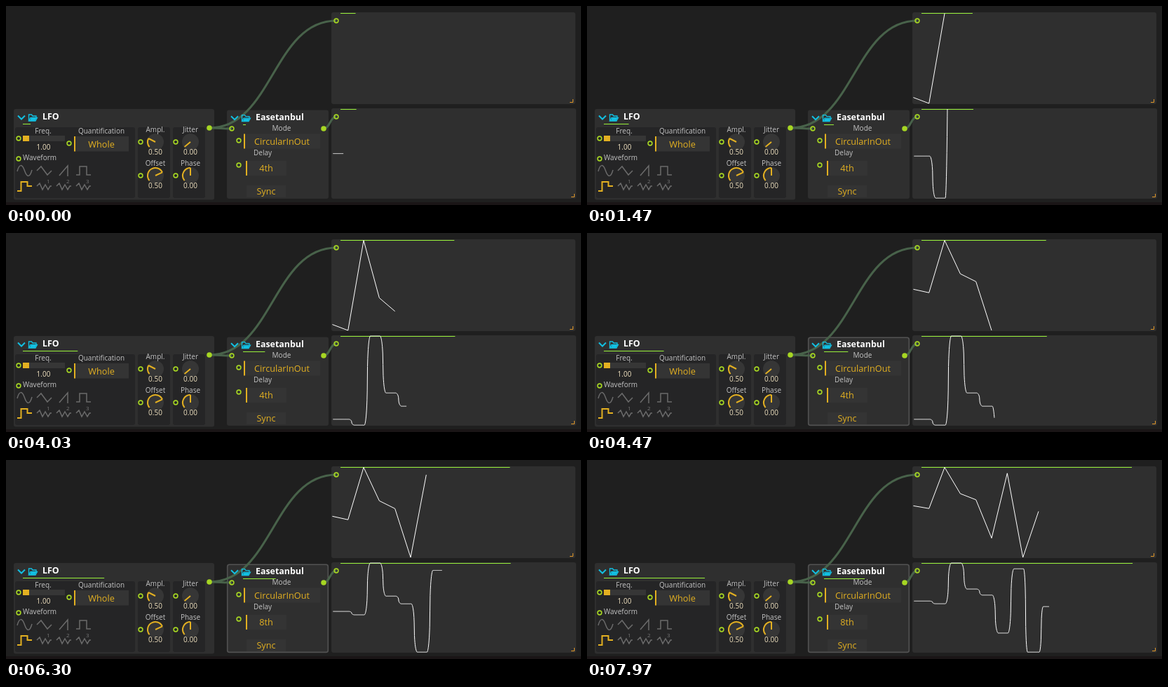
Recreate the animation shown at these times as an HTML page. Size 820 by 284 pixels, loop 8 s.

```html
<!DOCTYPE html>
<html lang="en">
<head>
<meta charset="utf-8">
<title>LFO patch</title>
<style>
html, body { margin: 0; width: 100%; height: 100%; overflow: hidden; background: #1f1f1f; }
svg { display: block; width: 820px; height: 284px; font-family: "Open Sans", "Noto Sans", sans-serif; fill: none; }
.label { font-size: 10px; fill: #c4c4c4; }
.number { font-size: 10px; fill: #f0e2c0; }
.value { font-size: 12.7px; fill: #e3b021; }
.title { font-size: 12.4px; font-weight: 700; fill: #fff; }
.digit { font-size: 8px; fill: #757575; }
.mid { text-anchor: middle; }
.cable { stroke: #48624a; stroke-width: 3; }
.wave { stroke: #6b6b6b; stroke-width: 1.5; }
.gold { stroke: #e3b021; stroke-width: 2; }
.port { stroke: #a6d623; stroke-width: 1.6; }
.plot { stroke: #fff; stroke-width: 1; stroke-linejoin: round; }
</style>
</head>
<body>
<svg id="stage" viewBox="0 0 820 284"></svg>
<script>
const stage = document.getElementById('stage');

const box = (x, y, w, h, fill, r = 0) =>
  `<rect x="${x}" y="${y}" width="${w}" height="${h}" rx="${r}" fill="${fill}"/>`;
const panel = (x, y, w, h) => box(x, y, w, h, '#2f2f2f', 3);
const inset = (x, w) => box(x, 173, w, 101, '#252526', 3);
const line = (d, cls) => `<path d="${d}" class="${cls}"/>`;
const text = (x, y, s, cls, id = '') => `<text x="${x}" y="${y}" class="${cls}" id="${id}">${s}</text>`;
const label = (x, y, s) => text(x, y, s, 'label mid');
const port = (x, y) => `<circle cx="${x}" cy="${y}" r="2.9" class="port"/>`;
const outlet = (x, y) => `<circle cx="${x}" cy="${y}" r="3.8" fill="#a6d623"/>`;
const bar = id => `<rect id="${id}" height="1" fill="#98f03a"/>`;

function choice(x, y, w, h, s, marked, id) {
  return box(x, y, w, h, '#343434') + (marked ? box(x, y, 2, h, '#e3b021') : '') +
    text(x + w / 2, y + h / 2 + 4.8, s, 'value mid', id);
}

// Angles are in degrees clockwise from the top.
function knob(x, y, angle, name, value) {
  const at = (deg, r) => {
    const a = deg * Math.PI / 180;
    return `${(x + r * Math.sin(a)).toFixed(2)} ${(y - r * Math.cos(a)).toFixed(2)}`;
  };
  const start = -130;
  return `<circle cx="${x}" cy="${y}" r="12" fill="#363636"/>` +
    line(`M${at(start, 11)}A11 11 0 ${angle - start > 180 ? 1 : 0} 1 ${at(angle, 11)}`, 'gold') +
    line(`M${x} ${y}L${at(angle, 11)}`, 'gold') +
    label(x, y - 14, name) + text(x, y + 18, value, 'number mid') + port(x - 21, y);
}

function heading(x, y, s) {
  return `<g stroke="#12c0e2" transform="translate(${x} ${y})">
    <path d="M0 0l5 5 5-5" stroke-width="2"/>
    <path d="M15.5 7.5V-1.5h4l1.5 2h5v2.5M15.5 7.5l2.5-4.5h9.5l-2.5 4.5z" stroke-width="1.3"/>
    <path d="M18.5 3.5h8l-2 4h-8z" fill="#12c0e2" stroke="none"/></g>` +
    text(x + 35, y + 5.5, s, 'title');
}

const noise = (x, n) =>
  line(`M${x} 257l4-4 4 9 4-7 4 7 3-5h2`, 'wave') + text(x + 14, 253, n, 'digit');

stage.innerHTML =
  box(0, 0, 820, 284, '#1f1f1f') + box(0, 280, 820, 4, '#1a1516') +
  panel(11, 147, 286, 129.5) + inset(13, 171) + inset(188, 46) + inset(238, 46) +
  panel(315, 148.5, 145, 126.5) + panel(464, 9, 348, 131) + panel(464, 146, 349, 129) +
  '<rect id="outline" x="315.7" y="149.2" width="143.6" height="125.2" rx="3" stroke="#525252" stroke-width="1.6"/>' +
  line('M290 174C380 174 381 21 471 21M290 174C306 174 306 175 322 175', 'cable') +
  line('M453 175C462 175 462 158 471 158', 'cable') +
  heading(17, 156.5, 'LFO') + heading(321, 157.2, 'Easetanbul') +
  // oscillator controls
  label(53, 182, 'Freq.') + box(24, 185, 60, 8, '#363636') + box(24, 185, 9, 8, '#e3b021') +
  text(53.5, 205, '1.00', 'number mid') +
  label(136, 182, 'Quantification') + choice(97, 186, 78, 21.5, 'Whole', true) +
  text(24, 220, 'Waveform', 'label') +
  line('M16 236C19 225 23 225 26.5 235S34 245 37 234', 'wave') +
  line('M44 235l6-6 9 12 6-6', 'wave') + line('M76 242L88 228V243', 'wave') +
  line('M100 241h5v-12h10v12h6', 'wave') +
  line('M16 264h5.5v-13h9v6h6.5', 'gold') +
  noise(44, 1) + noise(72, 2) + noise(100, 3) +
  knob(213, 194, -63, 'Ampl.', '0.50') + knob(263, 194, -130, 'Jitter', '0.00') +
  knob(213, 242, 65, 'Offset', '0.50') + knob(263, 242, 0, 'Phase', '0.00') +
  // easing controls
  label(393, 178.3, 'Mode') + choice(339, 182.5, 109, 21, 'CircularInOut', true) +
  label(366, 213, 'Delay') + choice(342, 221, 58, 21, '4th', true, 'delay') +
  choice(343, 256, 56, 17, 'Sync', false) +
  port(18, 189) + port(90, 196) + port(18, 218) + port(332, 192) + port(332, 227) + port(322, 175) +
  outlet(290, 174) + outlet(453, 175) +
  // scopes
  '<path d="M804 137.5H808.5V133M806 272.5H810.5V268" stroke="#e0982a"/>' +
  bar('rawBar') + bar('easedBar') + bar('lfoBar') + bar('easeBar') +
  '<path id="raw" class="plot"/><path id="eased" class="plot"/>' +
  port(471, 21) + port(471, 158);

const get = id => document.getElementById(id);
const LOOP = 8000, LEAD = 664, SPEED = 0.02232;
const levels = [.573, .543, 1, .708, .64, .214, .935, 0, .511];

const circularInOut = p => p < .5
  ? (1 - Math.sqrt(1 - 4 * p * p)) / 2
  : (1 + Math.sqrt(1 - 4 * (1 - p) ** 2)) / 2;

function easedLevel(time) {
  const k = Math.floor(time / 1000);
  if (!k) return levels[0];
  const p = Math.min(1, time % 1000 / (k < 7 ? 390 : 260));
  return levels[k - 1] + (levels[k] - levels[k - 1]) * circularInOut(p);
}

// Points are [time, level]; the vertical range always fits the data so far.
function plot(id, points, left, top, bottom) {
  const values = points.map(p => p[1]);
  const low = Math.min(...values), range = Math.max(...values) - low;
  const y = v => bottom - (bottom - top) * (range ? (v - low) / range : .5);
  get(id).setAttribute('d', points.length < 2 ? '' : 'M' +
    points.map(([time, v]) => `${(left + time * SPEED).toFixed(2)} ${y(v).toFixed(2)}`).join('L'));
}

function setBar(id, x, y, width) {
  const el = get(id);
  el.setAttribute('x', x);
  el.setAttribute('y', y);
  el.setAttribute('width', width);
}

function draw(t) {
  const now = t + LEAD;
  const raw = levels.slice(0, Math.floor(now / 1000) + 1).map((v, i) => [i * 1000, v]);
  const samples = [];
  for (let s = 0; s < now; s += 15) samples.push([s, easedLevel(s)]);
  samples.push([now, easedLevel(now)]);
  plot('raw', raw, 465.4, 10.5, 139);
  plot('eased', samples, 466.3, 147, 274.2);

  setBar('rawBar', 477, 10, 21.5 + t * .03494);
  setBar('easedBar', 477, 147, 22.6 + t * .03494);
  setBar('lfoBar', 24, 168, 11 + t * .01669);
  setBar('easeBar', 338, 169, 4 + t * .00678);

  get('outline').style.display = t < 4150 ? 'none' : '';
  get('delay').textContent = t < 5600 ? '4th' : '8th';
}

const begin = performance.now();
function tick() {
  draw((performance.now() - begin) % LOOP);
  requestAnimationFrame(tick);
}
tick();
</script>
</body>
</html>
```
